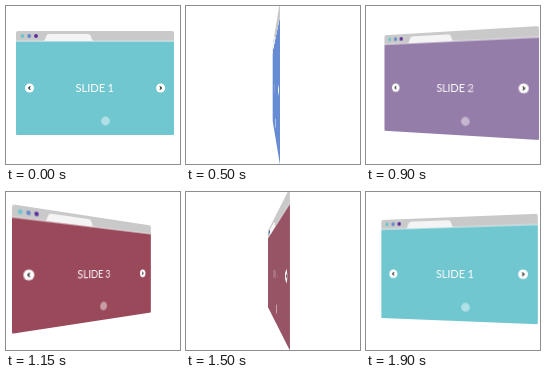
An HTML page that plays this animation: 174 by 158 pixels, repeating every 1950 ms.

```html
<!DOCTYPE html>
<html lang="en">
<head>
<meta charset="utf-8">
<title>Rotating slider</title>
<style>
  html, body { margin: 0; width: 100%; height: 100%; overflow: hidden; background: #fff; }
  #win { position: absolute; left: 10px; top: 25px; width: 158px; height: 104px; }
  text { font: 11.2px Lato, sans-serif; fill: #fff; }
</style>
</head>
<body>
<svg id="win" viewBox="0 0 158 104">
  <path d="M0 12V2Q0 0 2 0H156Q158 0 158 2V12Z" fill="#c9c9c9"/>
  <path d="M28 10.5L30.5 4.5Q31 3 33 3H72Q74 3 74.5 4.5L77 10.5Z" fill="#f4f4f4"/>
  <path d="M0 9.7H158V11H0Z" fill="#f4f4f4"/>
  <circle cx="6.4" cy="5" r="1.9" fill="#6ec6cf"/>
  <circle cx="13.2" cy="5" r="1.9" fill="#668ad0"/>
  <circle cx="20" cy="5" r="1.9" fill="#5b2d9c"/>
  <path id="page" d="M0 10.5H158V103Q158 104 157 104H1Q0 104 0 103Z"/>
  <g fill="#fff">
    <circle cx="13.5" cy="57" r="4.5"/>
    <circle cx="144.6" cy="57" r="4.5"/>
    <circle cx="89.5" cy="90" r="4.4" opacity=".45"/>
  </g>
  <path d="M14.3 55.3L12.6 57L14.3 58.7M143.8 55.3L145.5 57L143.8 58.7" fill="none" stroke="#222" stroke-width="1.1"/>
  <text x="89.3" y="61" text-anchor="end">SLIDE</text>
  <text class="digit" x="91.4" y="61">1</text>
  <text class="digit" x="91.4" y="61">2</text>
  <text class="digit" x="91.4" y="61">3</text>
</svg>
<script>
const LOOP = 1950, STEP = 50, SLIDE = LOOP / 3;
const teal = [112, 199, 208], blue = [104, 140, 211], purple = [149, 125, 170], maroon = [154, 73, 91];
const stops = [[150, teal], [430, blue], [780, blue], [900, purple], [1080, maroon], [1450, maroon], [1730, teal]];
const win = document.getElementById('win');
const page = document.getElementById('page');
const digits = document.querySelectorAll('.digit');

function smooth(from, to, t) {
  const p = Math.min(1, Math.max(0, (t - from) / (to - from)));
  return p * p * (3 - 2 * p);
}

function colorAt(t) {
  let color = teal;
  for (let i = 1; i < stops.length; i++) {
    const p = smooth(stops[i - 1][0], stops[i][0], t);
    color = color.map((c, k) => c + (stops[i][1][k] - c) * p);
  }
  return `rgb(${color.map(Math.round)})`;
}

function draw(now) {
  const t = Math.floor(now / STEP) * STEP % LOOP;
  // Half turns: past edge-on, the front shows again.
  const angle = (t * 360 / LOOP + 90) % 180 - 90;
  win.style.transform = `perspective(216px) rotateY(${angle}deg)`;
  page.setAttribute('fill', colorAt(t));

  const current = Math.floor(t / SLIDE);
  const fade = smooth(150, 430, t - current * SLIDE);
  digits.forEach((digit, i) => {
    digit.style.opacity = i === current ? 1 - fade : i === (current + 1) % 3 ? fade : 0;
  });
  requestAnimationFrame(draw);
}
draw(performance.now());
</script>
</body>
</html>
```
